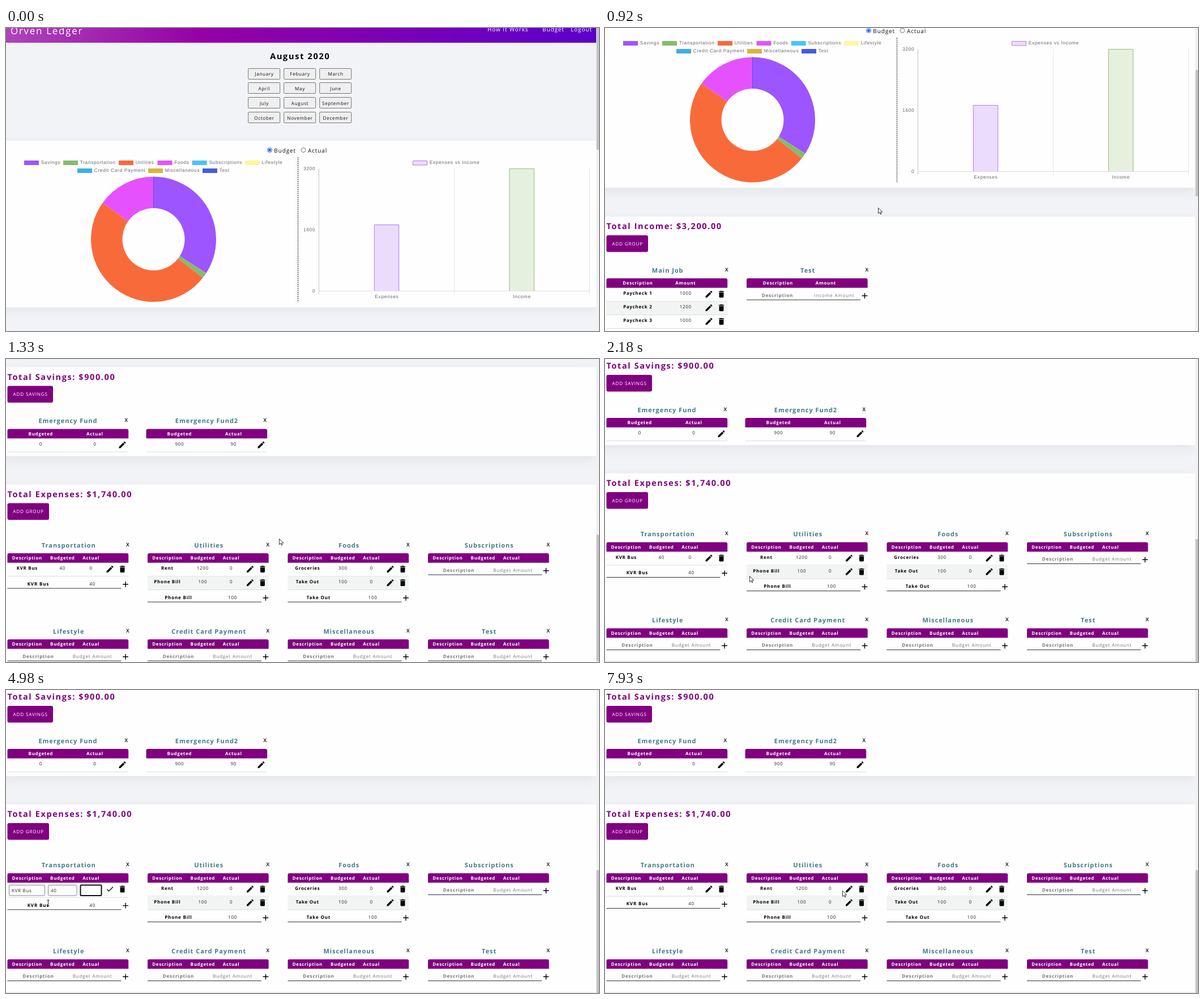
Write an HTML page with a canvas that moves like this. It is 1047 px wide and 535 px high and loops after 8000 ms.

```html
<!DOCTYPE html>
<html lang="en">
<head>
<meta charset="utf-8">
<title>Budget planner</title>
<style>
  html, body { margin: 0; width: 100%; height: 100%; overflow: hidden; background: #f2f3f6; }
  canvas { display: block; }
</style>
</head>
<body>
<canvas id="stage" width="1047" height="535"></canvas>
<script>
const LOOP = 8000;
const PURPLE = '#800080';
const ctx = document.getElementById('stage').getContext('2d');

const UI = '"Open Sans", sans-serif';
const CHART = '"Liberation Sans", Arial, sans-serif';

// Text styles: [weight, size, letter spacing, colour, family]
const style = {
  brand: [400, 17, 1.7, '#fff', UI],
  nav: [400, 10, 0.9, '#fff', UI],
  month: [700, 14.5, 1.7, '#000', UI],
  monthBtn: [400, 8.2, 0.65, '#111', UI],
  radio: [400, 10, 0.88, '#111', UI],
  chart: [400, 8.3, 0.69, '#666', CHART],
  section: [700, 14.5, 1.6, PURPLE, UI],
  button: [400, 8.2, 0.8, '#fff', UI],
  group: [700, 11, 0.97, '#3f7b8c', UI],
  close: [600, 9, 0, '#000', UI],
  head: [700, 8, 0.65, '#fff', UI],
  name: [700, 8, 0.7, '#000', UI],
  value: [400, 8, 0.7, '#222', UI],
  addName: [700, 8.1, 0.8, '#000', UI],
  addValue: [400, 8.1, 0.8, '#222', UI],
  hintName: [700, 8.1, 0.8, '#757575', UI],
  hintValue: [400, 8.1, 0.8, '#757575', UI]
};

const icon = {
  pencil: new Path2D('M3 17.25V21h3.75L17.81 9.94l-3.75-3.75L3 17.25zM20.71 7.04c.39-.39.39-1.02 0-1.41l-2.34-2.34c-.39-.39-1.02-.39-1.41 0l-1.83 1.83 3.75 3.75 1.83-1.83z'),
  trash: new Path2D('M6 19c0 1.1.9 2 2 2h8c1.1 0 2-.9 2-2V7H6v12zM19 4h-3.5l-1-1h-5l-1 1H5v2h14V4z'),
  check: new Path2D('M9 16.17L4.83 12l-1.42 1.41L9 19 21 7l-1.41-1.41z'),
  plus: new Path2D('M19 13h-6v6h-2v-6H5v-2h6V5h2v6h6v2z')
};
const arrow = new Path2D('M.5 .5V10.6L2.9 8.4 4.5 12 6 11.3 4.5 7.8H7.8Z');

// y is the middle of the capitals
function text(str, x, y, [weight, size, spacing, color, family], align = 'center') {
  ctx.font = `${weight} ${size}px ${family}`;
  ctx.letterSpacing = spacing + 'px';
  ctx.textRendering = 'geometricPrecision';
  ctx.textAlign = align;
  ctx.fillStyle = color;
  ctx.fillText(str, x + (align === 'left' ? 0 : spacing / 2), y + size * 0.36);
}

function rect(x, y, w, h, fill, stroke, radius = 0, line = 1) {
  ctx.beginPath();
  ctx.roundRect(x, y, w, h, radius);
  if (fill) { ctx.fillStyle = fill; ctx.fill(); }
  if (stroke) { ctx.strokeStyle = stroke; ctx.lineWidth = line; ctx.stroke(); }
}

function line(x1, y1, x2, y2, color, dash = []) {
  ctx.beginPath();
  ctx.setLineDash(dash);
  ctx.moveTo(x1, y1);
  ctx.lineTo(x2, y2);
  ctx.strokeStyle = color;
  ctx.lineWidth = 1;
  ctx.stroke();
  ctx.setLineDash([]);
}

function glyph(name, x, y, scale = 0.66) {
  ctx.save();
  ctx.translate(x - 12 * scale, y - 12 * scale);
  ctx.scale(scale, scale);
  ctx.fillStyle = '#000';
  ctx.fill(icon[name]);
  ctx.restore();
}

function panel(top, bottom) {
  ctx.save();
  ctx.shadowColor = 'rgba(60,60,90,.08)';
  ctx.shadowBlur = 18;
  ctx.shadowOffsetY = 6;
  rect(-10, top, 1052, bottom - top, '#fefefe');
  ctx.restore();
}

function drawHeader() {
  const fill = ctx.createLinearGradient(0, 0, 1042, 60);
  fill.addColorStop(0, '#ad45b9');
  fill.addColorStop(0.33, '#9600a6');
  fill.addColorStop(1, '#5c00ca');
  rect(0, -40, 1042, 66, fill);
  text('Orven Ledger', 8, 4.5, style.brand, 'left');
  text('How It Works', 850, 2, style.nav, 'left');
  text('Budget', 947, 2, style.nav, 'left');
  text('Logout', 997, 2, style.nav, 'left');
}

function drawMonths() {
  text('August 2020', 518.5, 49.5, style.month);
  const months = ['January', 'Febuary', 'March', 'April', 'May', 'June', 'July',
    'August', 'September', 'October', 'November', 'December'];
  months.forEach((m, i) => {
    const x = 455.7 + (i % 3) * 63, y = 81 + Math.floor(i / 3) * 25.8;
    rect(x - 28, Math.round(y - 9.5) - 0.5, 56, 19, '#efefef', '#777', 1.5);
    text(m, x, y + 0.5, style.monthBtn);
  });
}

function radio(x, y, on) {
  ctx.lineWidth = 1;
  ctx.strokeStyle = on ? '#1f66e5' : '#767676';
  ctx.beginPath();
  ctx.arc(x, y, 4, 0, 7);
  ctx.stroke();
  if (!on) return;
  ctx.beginPath();
  ctx.arc(x, y, 2.5, 0, 7);
  ctx.fillStyle = '#1f66e5';
  ctx.fill();
}

function drawDonut() {
  const legend = [
    ['Savings', 32, 238, '#9d55ff'], ['Transportation', 101, 238, '#86bb6a'],
    ['Utilities', 199, 238, '#f96a3a'], ['Foods', 267.5, 238, '#e552fd'],
    ['Subscriptions', 328.7, 238, '#4bc4f2'], ['Lifestyle', 422, 238, '#fdf79c'],
    ['Credit Card Payment', 126, 252, '#3faee6'], ['Miscellaneous', 251, 252, '#ddb23d'],
    ['Test', 347, 252, '#4759e4']
  ];
  for (const [label, x, y, color] of legend) {
    rect(x, y - 4, 26, 8, color);
    text(label, x + 29.7, y - 0.5, style.chart, 'left');
  }
  const amounts = [900, 40, 1300, 400];
  let from = -Math.PI / 2;
  amounts.forEach((amount, i) => {
    const to = from + amount / 2640 * Math.PI * 2;
    ctx.beginPath();
    ctx.arc(260.5, 373, 110.5, from, to);
    ctx.arc(260.5, 373, 55, to, from, true);
    ctx.fillStyle = legend[i][3];
    ctx.fill();
    from = to;
  });
  line(260.5, 262.5, 260.5, 318, '#4759e4');
}

function drawBars() {
  rect(718.5, 234.5, 25, 7.5, '#ebdcfe', '#b47af5');
  text('Expenses vs Income', 747.7, 237.5, style.chart, 'left');
  line(552.5, 248, 552.5, 470.5, '#c8c8c8');
  line(791.5, 248, 791.5, 470.5, '#e6e6e6');
  line(1030.5, 248, 1030.5, 470.5, '#e6e6e6');
  line(552.5, 464.5, 1030.5, 464.5, '#dedede');
  [3200, 1600, 0].forEach((n, i) => text(n, 546, 248 + i * 108, style.chart, 'right'));
  const bars = [['Expenses', 672, 1740, '#ebdcfd', '#b377f5'], ['Income', 910.7, 3200, '#e6f0df', '#94c07c']];
  for (const [label, x, amount, fill, stroke] of bars) {
    const top = Math.round(464 - amount / 3200 * 216) + 0.5;
    rect(x - 22, top, 44, 464 - top, fill);
    ctx.beginPath();
    ctx.moveTo(x - 21.7, 464);
    ctx.lineTo(x - 21.7, top);
    ctx.lineTo(x + 21.7, top);
    ctx.lineTo(x + 21.7, 464);
    ctx.strokeStyle = stroke;
    ctx.stroke();
    text(label, x, 474.5, style.chart);
  }
}

function drawCharts() {
  panel(199, 493);
  radio(465.5, 215.5, true);
  text('Budget', 473.3, 216, style.radio, 'left');
  radio(525, 215.5, false);
  text('Actual', 533, 216, style.radio, 'left');
  line(515.5, 228, 515.5, 484, '#111', [2.1, 1.4]);
  drawDonut();
  drawBars();
}

function section(top, bottom, title, button, width) {
  panel(top, bottom);
  text(title, 2.5, top + 17, style.section, 'left');
  rect(2.5, top + 33, width, 29.5, PURPLE, null, 3);
  text(button, 2.5 + width / 2, top + 47.8, style.button);
}

const kinds = {
  income: { cols: [['Description', 55], ['Amount', 139.5]], hint: 'Income Amount', addX: 154.5, shift: 0 },
  savings: { cols: [['Budgeted', 58.5], ['Actual', 154]], shift: 2.5 },
  expense: { cols: [['Description', 34.5], ['Budgeted', 97], ['Actual', 147.3]], hint: 'Budget Amount', addX: 149.7, shift: 0 }
};

function editRow(x, y, edit) {
  const fields = [[3, 63, 'KVR Bus'], [72, 50.5, '40'], [129, 37, edit.value]];
  fields.forEach(([dx, w, value], i) => {
    const focus = edit.focus && i === 2;
    rect(x + dx, y + 4.5, w, 18.5, '#fff', focus ? '#101010' : '#858585', 1.5, focus ? 2 : 1);
    text(value, x + dx + 4.5, y + 14, style.value, 'left');
  });
  if (edit.caret) line(x + 134 + edit.value.length * 5.3, y + 8, x + 134 + edit.value.length * 5.3, y + 19, '#000');
  glyph('check', x + 181, y + 11.5);
  glyph('trash', x + 203, y + 11.5);
}

function group(kind, x, y, title, rows = [], edit = null) {
  const { cols, hint, addX, shift } = kinds[kind];
  text(title, x + 107.7 - shift / 2, y, style.group);
  text('X', x + 212.3 - shift, y - 1.3, style.close);
  rect(x, y + 14, 213.7, 16.7, PURPLE, null, [3, 3, 0, 0]);
  for (const [label, dx] of cols) text(label, x + dx, y + 22.5, style.head);

  let end = y + 30.5;
  rows.forEach((row, i) => {
    const height = edit ? 26.3 : 24;
    if (i % 2) rect(x, end, 213.7, height, '#f2f3f3');
    if (edit) editRow(x, end, edit);
    else {
      row.forEach((cell, c) => {
        const bold = c === 0 && kind !== 'savings';
        text(cell, x + cols[c][1], end + 9.8, bold ? style.name : style.value);
      });
      glyph('pencil', x + (kind === 'savings' ? 203 : 181), end + 11.5);
      if (kind !== 'savings') glyph('trash', x + 203, end + 11.5);
    }
    end += height;
    line(x, end, x + 213.7, end, '#dcdcdc');
  });
  if (!hint) return;

  const last = rows[rows.length - 1];
  text(last ? last[0] : 'Description', x + 54, end + 13.5, last ? style.addName : style.hintName);
  text(last ? last[1] : hint, x + addX, end + 13.5, last ? style.addValue : style.hintValue);
  line(x, end + 21.5, x + 201, end + 21.5, '#333');
  glyph('plus', x + 208.5, end + 14.3, 0.69);
}

function drawTables(t) {
  section(544, 782, 'Total Income: $3,200.00', 'ADD GROUP', 73.5);
  group('income', 2.5, 639, 'Main Job', [['Paycheck 1', 1000], ['Paycheck 2', 1200], ['Paycheck 3', 1000]]);
  group('income', 250, 639, 'Test');

  section(834, 991, 'Total Savings: $900.00', 'ADD SAVINGS', 80.5);
  group('savings', 2.5, 929, 'Emergency Fund', [[0, 0]]);
  group('savings', 247.5, 929, 'Emergency Fund2', [[900, 90]]);

  section(1041, 1372, 'Total Expenses: $1,740.00', 'ADD GROUP', 73.5);
  const edit = t >= 2820 && t < 6380 && {
    focus: t >= 3510,
    value: t < 3890 ? '0' : t < 5530 ? '' : t < 5610 ? '4' : '40',
    caret: (t >= 4430 && t < 4980) || t >= 5530
  };
  const top = 1148.5, next = 1300.5;
  group('expense', 2.5, top, 'Transportation', [['KVR Bus', 40, t < 6840 ? 0 : 40]], edit);
  group('expense', 250, top, 'Utilities', [['Rent', 1200, 0], ['Phone Bill', 100, 0]]);
  group('expense', 497.5, top, 'Foods', [['Groceries', 300, 0], ['Take Out', 100, 0]]);
  group('expense', 745, top, 'Subscriptions');
  ['Lifestyle', 'Credit Card Payment', 'Miscellaneous', 'Test']
    .forEach((title, i) => group('expense', 2.5 + i * 247.5, next, title));
}

// Tracks: [time, value, ...], linear between the points
const scrollTrack = [[0, 0], [470, 0], [620, 72], [770, 139], [915, 139], [920, 211],
  [1010, 211], [1330, 819.5], [1470, 819.5], [1630, 839]];
const cursorTrack = [[0, 430, -40], [70, 435, -20], [450, 482, 317], [1730, 482, 317], [1880, 370, 375],
  [1960, 260, 410], [2030, 190, 405], [2180, 255, 383], [2300, 255, 383], [2500, 182, 365],
  [2700, 182, 365], [2740, 181, 354], [3130, 181, 354], [3510, 149, 355], [3860, 149, 355],
  [3970, 74.5, 376], [5940, 74.5, 376], [6260, 182, 352], [6420, 182, 352], [6770, 367, 370],
  [7180, 635, 374], [7620, 435, 352], [7770, 398, 350], [7930, 419, 354]];

function at(track, t) {
  const i = track.findIndex(k => k[0] > t);
  if (i < 0) return track[track.length - 1].slice(1);
  const a = track[i - 1], b = track[i], p = (t - a[0]) / (b[0] - a[0]);
  return a.slice(1).map((v, n) => v + (b[n + 1] - v) * p);
}

function drawCursor(t) {
  const [x, y] = at(cursorTrack, t);
  if (t >= 3350 && t < 6080) {
    line(x, y - 5, x, y + 5, '#222');
    line(x - 2, y - 5, x + 2, y - 5, '#222');
    line(x - 2, y + 5, x + 2, y + 5, '#222');
    return;
  }
  ctx.save();
  ctx.translate(x, y);
  ctx.fillStyle = '#fff';
  ctx.fill(arrow);
  ctx.strokeStyle = '#23232b';
  ctx.lineWidth = 0.9;
  ctx.stroke(arrow);
  ctx.restore();
}

function draw(now) {
  const t = now % LOOP;
  const [scroll] = at(scrollTrack, t);
  rect(0, 0, 1047, 535, '#f2f3f6');
  ctx.save();
  ctx.translate(0, -scroll);
  drawHeader();
  drawMonths();
  drawCharts();
  drawTables(t);
  ctx.restore();
  rect(1042, 0, 5, 535, '#f1f1f1');
  rect(1042.7, scroll * 0.3885 - 8, 4.3, 223, '#c1c1c1');
  drawCursor(t);
}

let start;
function tick(now) {
  start ??= now;
  draw(now - start);
  requestAnimationFrame(tick);
}
requestAnimationFrame(tick);
</script>
</body>
</html>
```
